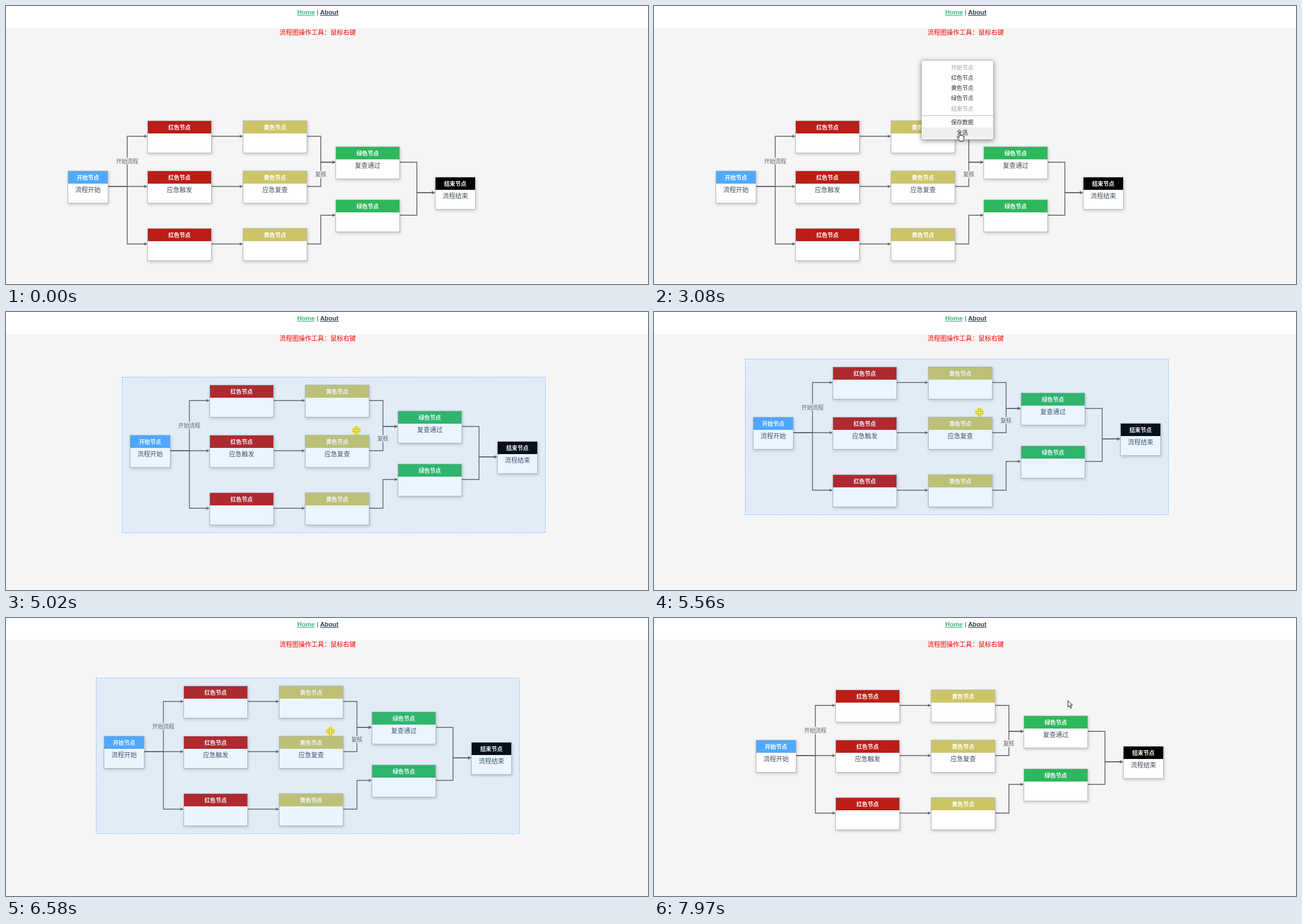
An HTML page for the animation above (8000 ms loop, 1136 by 493 pixels).

```html
<!DOCTYPE html>
<html lang="zh-CN">
<head>
<meta charset="utf-8">
<title>流程图</title>
<style>
html, body { margin: 0; width: 100%; height: 100%; overflow: hidden; background: #fff; }
svg { display: block; }
text { font-family: "Noto Sans CJK SC", "Noto Sans CJK", sans-serif; white-space: pre; }
.nav { font: 11.25px "Liberation Sans", Arial, sans-serif; fill: #2c3e50; }
.link { font-weight: bold; text-decoration: underline; }
.mid { text-anchor: middle; }
.small { font-size: 9.9px; }
.big { font-size: 11.25px; }
.head { fill: #fff; font-weight: bold; }
.box { fill: #fff; filter: drop-shadow(1px 2px 2.5px rgba(0,0,0,.2)); }
.edge { fill: none; stroke: #b9b9b9; }
.wire { fill: none; stroke: #5c5c5c; stroke-width: 1.4; }
.menu { fill: #fff; stroke: #bebebe; filter: drop-shadow(0 2px 4px rgba(0,0,0,.45)); }
.cur { fill: #fff; stroke: #000; stroke-linejoin: round; }
</style>
</head>
<body>
<svg id="stage" width="1136" height="493" viewBox="0 0 1136 493"></svg>
<script>
const LOOP = 8000, TICK = 77;
const TITLE = '流程图操作工具：鼠标右键';
const TITLE_X = 484, EM = 11.25;
const PANEL = { x: 95, y: 189, w: 750, h: 277 };
const NODE_H = 58, MID = 28;

const COLUMNS = [
  { x: 109, w: 72, color: '#50a9ff', head: '开始节点', rows: [292], body: ['流程开始'] },
  { x: 250, w: 114, color: '#bb1d17', head: '红色节点', rows: [203, 292, 394], body: ['', '应急触发', ''] },
  { x: 419, w: 114, color: '#ccc568', head: '黄色节点', rows: [203, 292, 394], body: ['', '应急复查', ''] },
  { x: 583, w: 114, color: '#2eb85c', head: '绿色节点', rows: [249, 343], body: ['复查通过', ''] },
  { x: 759, w: 72, color: '#000', head: '结束节点', rows: [303], body: ['流程结束'] }
];

const ITEMS = [...COLUMNS.map(c => c.head), '保存数据', '全选'].map((name, i) => ({
  name,
  y: 109 + 18.2 * i + (i > 4 ? 6.3 : 0),
  on: i !== 0 && i !== 4
}));

// each move: start time, end time, then the place reached
const DRAG = [
  [4700, 5000, 110, -74], [5100, 5540, 66, -106], [5640, 6540, 64, -83], [6600, 6730, 71, -76]
];
// pointer moves, to which the drag is added
const POINTER = [
  [130, 220, 523, 163], [450, 880, 482, 48], [950, 1610, 617, 48], [1900, 2000, 643, 77],
  [2390, 2540, 473, 97], [2850, 3080, 541, 224], [4240, 4600, 510, 284],
  [7100, 7430, 959, 266], [7500, 7930, 661, 222]
];
const PRESS = [[900, 1700], [2150, 2220], [2540, 2690], [4620, 6720], [7430, 7500]];

const label = (s, x, y, cls, extra = '') =>
  `<text class="mid ${cls}" x="${x}" y="${y}" ${extra}>${s}</text>`;

function columnSvg({ x, w, color, head, rows, body }) {
  const cx = x + w / 2;
  return rows.map((y, i) => `
    <rect class="box" x="${x}" y="${y}" width="${w}" height="${NODE_H}"/>
    <rect class="edge" x="${x + .5}" y="${y + .5}" width="${w - 1}" height="${NODE_H - 1}"/>
    <rect x="${x + 1}" y="${y + 1}" width="${w - 2}" height="22" fill="${color}"/>
    ${label(head, cx, y + 15.8, 'small head')}
    ${label(body[i], cx, y + 38.2, 'big', 'fill="#3f4f5f"')}`).join('');
}

function wireSvg(a, b, y1, y2) {
  const x1 = a.x + a.w, bend = (x1 + b.x) / 2 - 1;
  return `<path class="wire" d="M${x1} ${y1 + MID}H${bend}V${y2 + MID}H${b.x - 1}"/>
    <path d="M${b.x} ${y2 + MID}l-6 -3 1.8 3 -1.8 3z" fill="#5c5c5c"/>`;
}

// a column fans out to a longer one, pairs with an equal one, and merges into a shorter one
function linksSvg(a, k) {
  const b = COLUMNS[k + 1];
  if (!b) return '';
  const n = a.rows.length, m = b.rows.length;
  if (m > n) return b.rows.map(y => wireSvg(a, b, a.rows[0], y)).join('');
  return a.rows.map((y, i) => wireSvg(a, b, y, b.rows[m === n ? i : i >> 1])).join('');
}

function tag(s, x, y) {
  const w = s.length * 9.9;
  return `<rect x="${x - w / 2}" y="${y - 6.5}" width="${w}" height="13" fill="#f5f5f5" fill-opacity=".75"/>
    ${label(s, x, y + 3.7, 'small', 'fill="#666"')}`;
}

document.getElementById('stage').innerHTML = `
  <rect width="1136" height="493" fill="#fff"/>
  <rect y="39" width="1136" height="453" fill="#f5f5f5"/>
  <text class="nav" x="515.3" y="15"><tspan class="link" fill="#42b983">Home</tspan> | <tspan class="link">About</tspan></text>
  <text class="big" x="${TITLE_X}" y="51" fill="#f00">${TITLE}</text>
  <rect id="mark" x="${TITLE_X}" y="39" height="16" fill="#3390ff"/>
  <text id="marked" class="big" x="${TITLE_X}" y="51" fill="#fff"></text>
  <g id="chart">
    ${COLUMNS.map(linksSvg).join('')}
    ${COLUMNS.map(columnSvg).join('')}
    ${tag('开始流程', 214.5, 275)}${tag('复核', 557, 298.5)}
    <rect id="panel" x="${PANEL.x + .5}" y="${PANEL.y + .5}" width="${PANEL.w - 1}" height="${PANEL.h - 1}"
      fill="#409eff" fill-opacity=".1" stroke="#409eff" stroke-opacity=".7" stroke-dasharray="2.5 2"/>
  </g>
  <g id="menu">
    <rect class="menu" x="473.5" y="96.5" width="127" height="140" rx="2.5"/>
    <rect id="hover" x="475" width="124" height="18.5" fill="#eee"/>
    <path d="M474 194.5H600" stroke="#bebebe"/>
    ${ITEMS.map(i => label(i.name, 545.5, i.y + 3.7, 'small', `fill="${i.on ? '#2f2f2f' : '#a0a0a0'}"`)).join('')}
  </g>
  <g id="mouse">
    <path id="arrow" class="cur" transform="scale(.75)" stroke-width="1.2"
      d="M.5.5V16L4 12.7 6.6 18.6 9 17.5 6.5 11.7H11.4Z"/>
    <path id="hand" class="cur" transform="scale(.75) translate(-6.6)" stroke-width="1.3"
      d="M5 2a1.6 1.6 0 0 1 3.2 0V8a1.5 1.5 0 0 1 3 .4a1.5 1.5 0 0 1 2.8 .8a1.4 1.4 0 0 1 2.6 .8V15c0 2-1.5 3-1.5 6H6.5c0-2-4.5-6-6-9c-.6-2 2-2.3 3-.8L5 13Z"/>
    <path id="beam" fill="none" stroke="#000" d="M-2.5 -6.5H2.5M0 -6.5V6.5M-2.5 6.5H2.5"/>
    <path id="move" class="cur" stroke-width=".8"
      d="M0-7.5L3-4.6H1.2V-1.2H4.6V-3L7.5 0 4.6 3V1.2H1.2V4.6H3L0 7.5-3 4.6H-1.2V1.2H-4.6V3L-7.5 0-4.6-3V-1.2H-1.2V-4.6H-3Z"/>
    <circle id="press" r="8.5" fill="#f4ee30" fill-opacity=".65"/>
  </g>`;

const $ = id => document.getElementById(id);
const show = (id, on) => $(id).setAttribute('visibility', on ? 'visible' : 'hidden');
const within = (t, a, b) => t >= a && t < b;

function travel(moves, x, y, t) {
  for (const [a, b, tx, ty] of moves) {
    const f = Math.max(0, Math.min(1, (t - a) / (b - a)));
    const e = f * f * (3 - 2 * f);
    x += (tx - x) * e;
    y += (ty - y) * e;
  }
  return [Math.round(x), Math.round(y)];
}

function draw(time) {
  const t = Math.floor(time / TICK) * TICK;
  const [dx, dy] = travel(DRAG, 0, 0, t);
  const [x, y] = travel(POINTER, 819, 349, t);
  const mx = x + dx, my = y + dy;
  const menuOn = within(t, 2600, 3840);
  const panelOn = within(t, 3900, 7430);

  $('chart').setAttribute('transform', `translate(${dx} ${dy})`);
  show('panel', panelOn);

  const chars = within(t, 950, 2150)
    ? Math.max(0, Math.min(TITLE.length, Math.round((mx - TITLE_X) / EM))) : 0;
  $('mark').setAttribute('width', chars * EM);
  $('marked').textContent = TITLE.slice(0, chars);

  const item = menuOn && mx > 475 && ITEMS.find(i => i.on && Math.abs(my - i.y) < 9.1);
  show('menu', menuOn);
  show('hover', item);
  if (item) $('hover').setAttribute('y', item.y - 9);

  const overPanel = panelOn && within(x - PANEL.x, 0, PANEL.w) && within(y - PANEL.y, 0, PANEL.h);
  const kind = item ? 'hand' : overPanel ? 'move' : within(t, 850, 1700) ? 'beam' : 'arrow';
  $('mouse').setAttribute('transform', `translate(${mx} ${my})`);
  for (const id of ['arrow', 'hand', 'beam', 'move']) show(id, t > 100 && id === kind);
  show('press', PRESS.some(([a, b]) => within(t, a, b)));
}

function frame() {
  draw(performance.now() % LOOP);
  requestAnimationFrame(frame);
}
frame();
</script>
</body>
</html>
```
